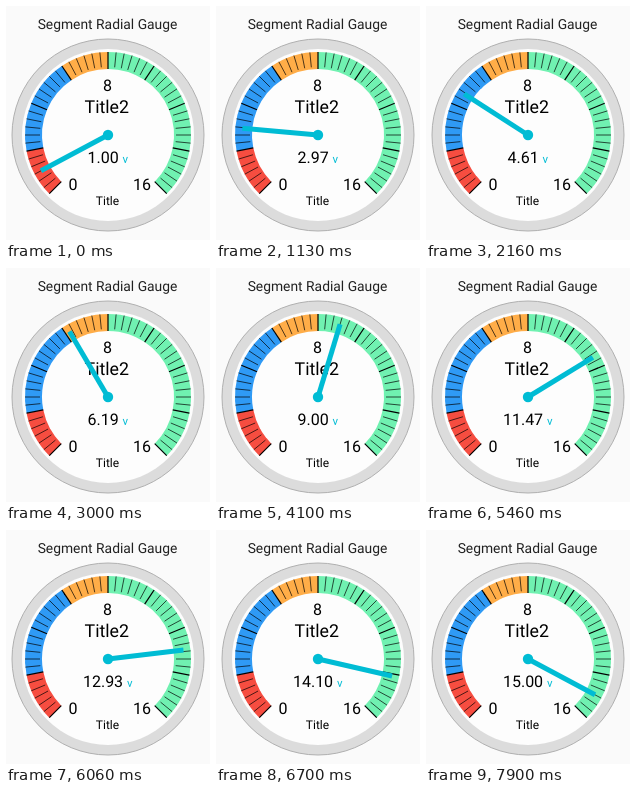
An HTML page that plays this animation: 204x234 px, repeating every 8000 ms.

```html
<!DOCTYPE html>
<html lang="en">
<head>
<meta charset="utf-8">
<title>Segment Radial Gauge</title>
<style>
  html, body { margin: 0; width: 100%; height: 100%; overflow: hidden; background: #fafafa; }
  svg { display: block; width: 204px; height: 234px; }
  text { font-family: Roboto, sans-serif; text-anchor: middle; fill: #000; text-rendering: geometricPrecision; }
</style>
</head>
<body>
<svg viewBox="0 0 204 234">
  <rect width="204" height="234" fill="#fafafa"/>
  <text x="101.5" y="23" font-size="13.85" style="fill:#212121">Segment Radial Gauge</text>
  <circle cx="102" cy="129" r="96" fill="#dcdcdc" stroke="#b0b0b0"/>
  <circle cx="102" cy="129" r="86" fill="#fdfdfd"/>
  <g id="dial" transform="translate(102 129)" fill="none"></g>
  <text x="101.5" y="84.8" font-size="16">8</text>
  <text x="67" y="183.8" font-size="16">0</text>
  <text x="136" y="183.8" font-size="16">16</text>
  <text x="100.8" y="107" font-size="17.8">Title2</text>
  <text x="101.8" y="156.7" font-size="16"><tspan id="num">1.00</tspan> <tspan font-size="11.5" fill="#00bcd4">v</tspan></text>
  <text x="101.5" y="199" font-size="12">Title</text>
  <g transform="translate(102 129)">
    <path id="needle" d="M0 0V-76" stroke="#00bcd4" stroke-width="5"/>
    <circle r="5.2" fill="#00bcd4"/>
  </g>
</svg>
<script>
const LOOP = 8000, MAX = 16, SWEEP = 270;
const dial = document.getElementById('dial');
const num = document.getElementById('num');
const needle = document.getElementById('needle');

const degrees = v => v / MAX * SWEEP - SWEEP / 2;

function polar(r, v) {
  const a = degrees(v) * Math.PI / 180;
  return `${(r * Math.sin(a)).toFixed(2)} ${(-r * Math.cos(a)).toFixed(2)}`;
}

function stroke(d, color, width) {
  const p = document.createElementNS('http://www.w3.org/2000/svg', 'path');
  p.setAttribute('d', d);
  p.setAttribute('stroke', color);
  p.setAttribute('stroke-width', width);
  dial.append(p);
}

const segments = [[0, 2, '#f64d40'], [2, 6, '#2f9af5'], [6, 8, '#ffad48'], [8, 16, '#70f1b1']];
for (const [from, to, color] of segments) {
  const large = degrees(to) - degrees(from) > 180 ? 1 : 0;
  stroke(`M${polar(74.5, from)}A74.5 74.5 0 ${large} 1 ${polar(74.5, to)}`, color, 17);
}

const TICKS = 48;
for (let i = 0; i <= TICKS; i++) {
  const v = i / TICKS * MAX, major = i % 6 === 0;
  stroke(`M${polar(major ? 66 : 68, v)}L${polar(83, v)}`, '#000', major ? 1.2 : 0.7);
}

// Time and value pairs, joined by a monotone cubic.
const keys = [
  [500, 1], [1300, 3.35], [2160, 4.61], [3000, 6.19], [3800, 8.54], [4100, 9],
  [4630, 9.8], [5460, 11.47], [6300, 13.45], [6700, 14.1], [7160, 14.82],
  [7500, 14.95], [7900, 15]
];
const last = keys.length - 1;
const rate = i => (keys[i + 1][1] - keys[i][1]) / (keys[i + 1][0] - keys[i][0]);
const slopes = keys.map((k, i) => {
  if (i === 0) return rate(0) * 1.2;
  if (i === last) return 0;
  const a = rate(i - 1), b = rate(i);
  return 2 * a * b / (a + b);
});

function valueAt(t) {
  if (t <= keys[0][0]) return keys[0][1];
  if (t >= keys[last][0]) return keys[last][1];
  const i = keys.findIndex(k => k[0] > t) - 1;
  const [t0, v0] = keys[i], [t1, v1] = keys[i + 1];
  const h = t1 - t0, u = (t - t0) / h, w = 1 - u;
  return v0 * w * w * (1 + 2 * u) + v1 * u * u * (3 - 2 * u)
    + h * u * w * (slopes[i] * w - slopes[i + 1] * u);
}

function draw(t) {
  const v = valueAt(t);
  num.textContent = v.toFixed(2);
  needle.setAttribute('transform', `rotate(${degrees(v).toFixed(3)})`);
}

const start = performance.now();
function tick() {
  draw((performance.now() - start) % LOOP);
  requestAnimationFrame(tick);
}
tick();
</script>
</body>
</html>
```
